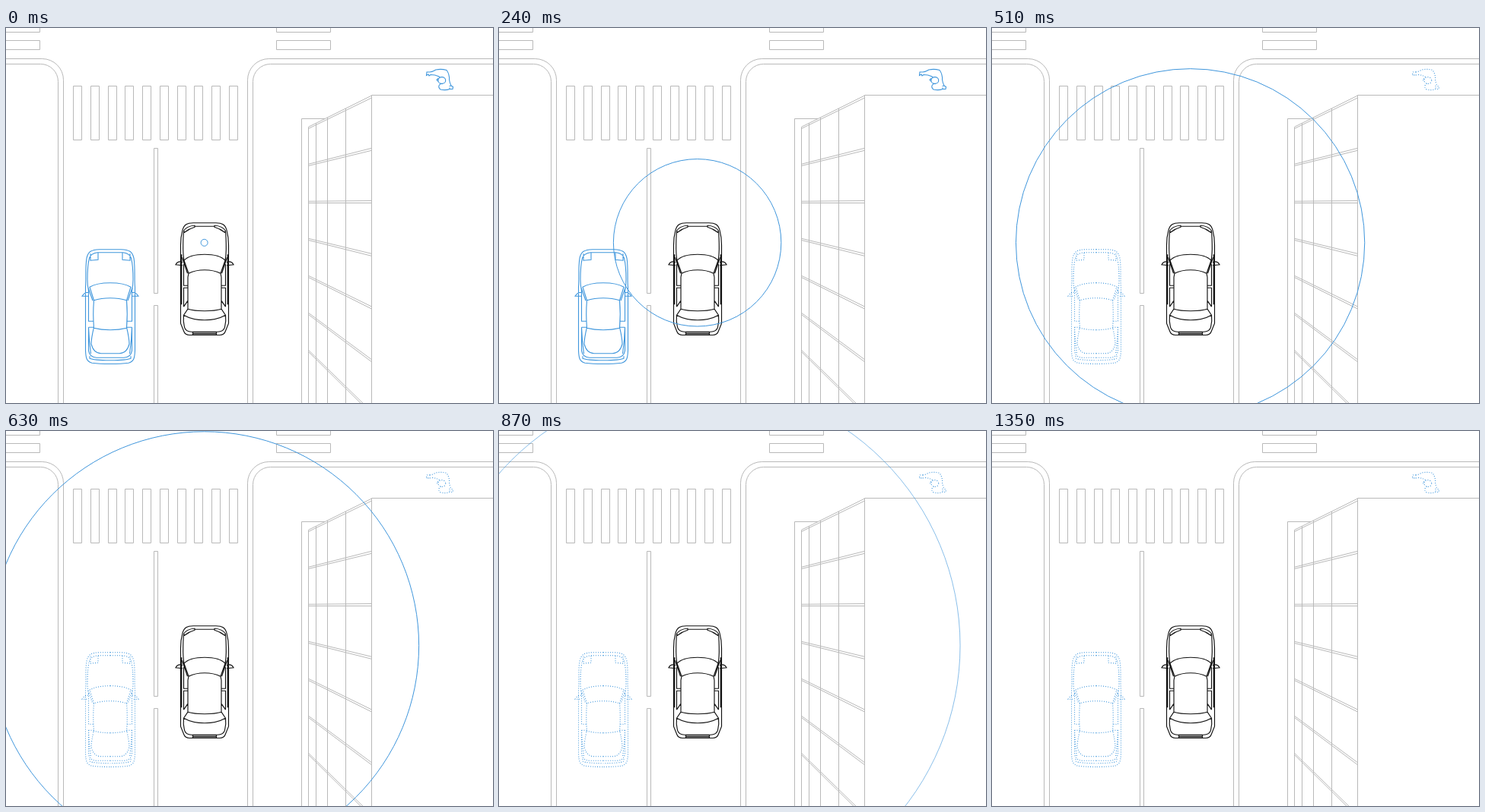
Recreate the animation shown at these times as an HTML page with a canvas. Size 640 by 494 pixels, loop 1.8 s.

```html
<!DOCTYPE html>
<html lang="en">
<head>
<meta charset="utf-8">
<title>Sensor pulse at a crossing</title>
<style>
html, body { margin: 0; width: 100%; height: 100%; overflow: hidden; background: #fff; }
canvas { display: block; width: 640px; height: 494px; }
</style>
</head>
<body>
<canvas id="stage" width="640" height="494"></canvas>
<script>
const ctx = document.getElementById('stage').getContext('2d');
const LOOP = 1800, STEP = 30;
const GREY = '#b9b9b9', BLUE = '#3f96dc', BLACK = '#111';

// Cars are drawn as a left half, mirrored about the centre line
function mirrored(cx, top, d) {
  const half = new Path2D(d), path = new Path2D();
  for (const side of [1, -1]) path.addPath(half, new DOMMatrix([side, 0, 0, 1, cx, top]));
  return path;
}

const ownCar = mirrored(261, 256.2, `
  M0 .5 H-15 C-23 .5 -27 3 -29 10 Q-31.5 19 -31.5 30 V133 L-27 144 Q-25.5 148 -20 148.3 H0
  M0 5 H-13 M-13 3.8 V6 Q-20 8 -26.5 13 L-27.5 11 Q-24 5 -13 3.8
  M-27.5 12 Q-28.3 20 -28.3 35 Q-28 45 -27 50
  M0 42 Q-20 42 -27 50 L-21 67 Q-12 62.5 0 62.5
  M-29.5 46 L-22.5 67
  M-29 52.5 Q-35 50 -38 55.5 L-29 56.5
  M-21 67 L-22 72 V114 Q-14 116.5 0 116.5
  M-22 114 L-27.5 122 Q-16 128.5 0 128.5
  M-27.5 122 Q-28.5 130 -26.5 138 Q-25 144 -17 144 H0
  M-27.5 55 V83 H-22 M-27.5 111 V86 H-22 M-27.5 111 L-22 103
  M0 144.5 H-15.5 V148`);
const ownTrim = mirrored(261, 256.2, 'M-30.5 42 V108 M0 146.5 H-15');

const otherCar = mirrored(137, 291.2, `
  M0 .5 H-14 C-25 1 -29 3 -31 12 C-33 25 -31.5 40 -32.5 50 V134 C-32 144 -31 148 -24 150 Q-15 151.3 0 151.3
  M0 4.5 H-17 Q-26 6 -27.5 12 Q-30 22 -30 40 Q-30 48 -28.5 55
  M-26 6 V15 L-16 14 V5
  M0 44.5 Q-18 44.5 -27 50 L-21.5 67.5 Q-12 64.5 0 64.5
  M-29 51 L-23 68
  M-29 57 Q-34 57 -37 62 H-29
  M-28.5 55 V95 H-22
  M-21.5 67.5 Q-23 85 -21.5 104 Q-12 106.5 0 106.5
  M-28.5 103 H-21.5 Q-25 118 -25 125 Q-22 137.5 -12 137.5 H0
  M-28.5 103 Q-28 120 -25.5 138
  M-28.5 103 V134 Q-27 143 -18 143 H0
  M-27 141 V144 Q-22 146.5 0 146.5`);

const walker = new Path2D(`
  M557 58 L553 58 L552.5 62.5 L555 61 L556 63 L558 61.5 Q564 61.5 568 63.5
  Q571 65 570 66 M557 58 Q561 57.5 565 55 Q572 53.5 579 55.5 Q583 61 582.5 68
  Q583 72 585 76 L587.5 77.5 L587 80.5 L583 80.5 Q578 82.5 571 81
  Q567.5 78 569.5 75 Q571 72.5 574 73.5 M582.5 76.5 L585 76 M583 78.5 L583 80.5
  M568 66.5 L566 68.3 L568 70.3
  M577.7 69 A4.9 4.4 0 1 1 567.9 69 A4.9 4.4 0 1 1 577.7 69`);

function streetPath() {
  const p = new Path2D();
  const line = (x1, y1, x2, y2) => { p.moveTo(x1, y1); p.lineTo(x2, y2); };

  for (const x of [-20.5, 355.5]) {
    const w = x < 0 ? 65 : 71;
    p.rect(x, -10.5, w, 16);
    p.rect(x, 16.5, w, 12);
  }
  for (let i = 0; i < 10; i++) p.rect(Math.round(88 + i * 22.75) + 0.5, 76.5, 11, 71);
  p.rect(194.5, 158.5, 5, 191);
  p.rect(194.5, 365.5, 5, 140);

  // Kerbs
  const kerb = (edge, x, y, r) => {
    p.moveTo(edge, y);
    p.arcTo(x, y, x, y + r, r);
    p.lineTo(x, 500);
  };
  kerb(-5, 75.5, 40.5, 28);
  kerb(-5, 68.5, 47.5, 23);
  kerb(645, 317.5, 40.5, 28);
  kerb(645, 324.5, 47.5, 23);

  // Building
  line(645, 88.5, 480.5, 88.5);
  line(480.5, 88.5, 480.5, 500);
  line(419, 119.5, 388.5, 119.5);
  line(388.5, 119.5, 388.5, 500);
  for (const x of [397.5, 407.5, 422.5, 446.5]) line(x, 130.5 - (x - 397.5) * 0.5, x, 500);
  const right = [89, 158.3, 227.5, 297.3, 367, 436.8, 505.5];
  right.forEach((y, i) => {
    const left = 130.3 + i * 49;
    line(397.5, left, 480.5, y);
    line(397.5, left + 2.2, 480.5, y + 3);
  });
  return p;
}
const street = streetPath();

function stroke(path, color, width = 1, alpha = 1, dash = []) {
  ctx.strokeStyle = color;
  ctx.lineWidth = width;
  ctx.globalAlpha = alpha;
  ctx.setLineDash(dash);
  ctx.stroke(path);
}

// Share of the dotted look: solid, then dotted, each for 450 ms
function dottedShare(t) {
  const phase = t % 900;
  return phase < 420 ? 0 : phase < 450 ? 0.5 : 1;
}

function pulse(t) {
  const turn = 681, end = 1170;
  if (t >= end) return;
  const r = 4.5 + 0.4405 * Math.min(t, turn) + 0.2167 * Math.max(0, t - turn);
  const ring = new Path2D();
  ring.arc(260.6, 282.8, r, 0, Math.PI * 2);
  stroke(ring, BLUE, 1, Math.min(1, (end - t) / (end - turn)));
}

function draw(t) {
  ctx.globalAlpha = 1;
  ctx.fillStyle = '#fff';
  ctx.fillRect(0, 0, 640, 494);
  stroke(street, GREY);

  const dotted = dottedShare(t);
  for (const shape of [otherCar, walker]) {
    if (dotted < 1) stroke(shape, BLUE, 1.1, 1 - dotted);
    if (dotted > 0) stroke(shape, BLUE, 1.1, dotted, [1, 2]);
  }
  stroke(ownCar, BLACK, 1.15);
  stroke(ownTrim, BLACK, 1.6);
  pulse(t);
}

function tick(now) {
  draw(Math.floor((now % LOOP) / STEP) * STEP);
  requestAnimationFrame(tick);
}
draw(0);
requestAnimationFrame(tick);
</script>
</body>
</html>
```
